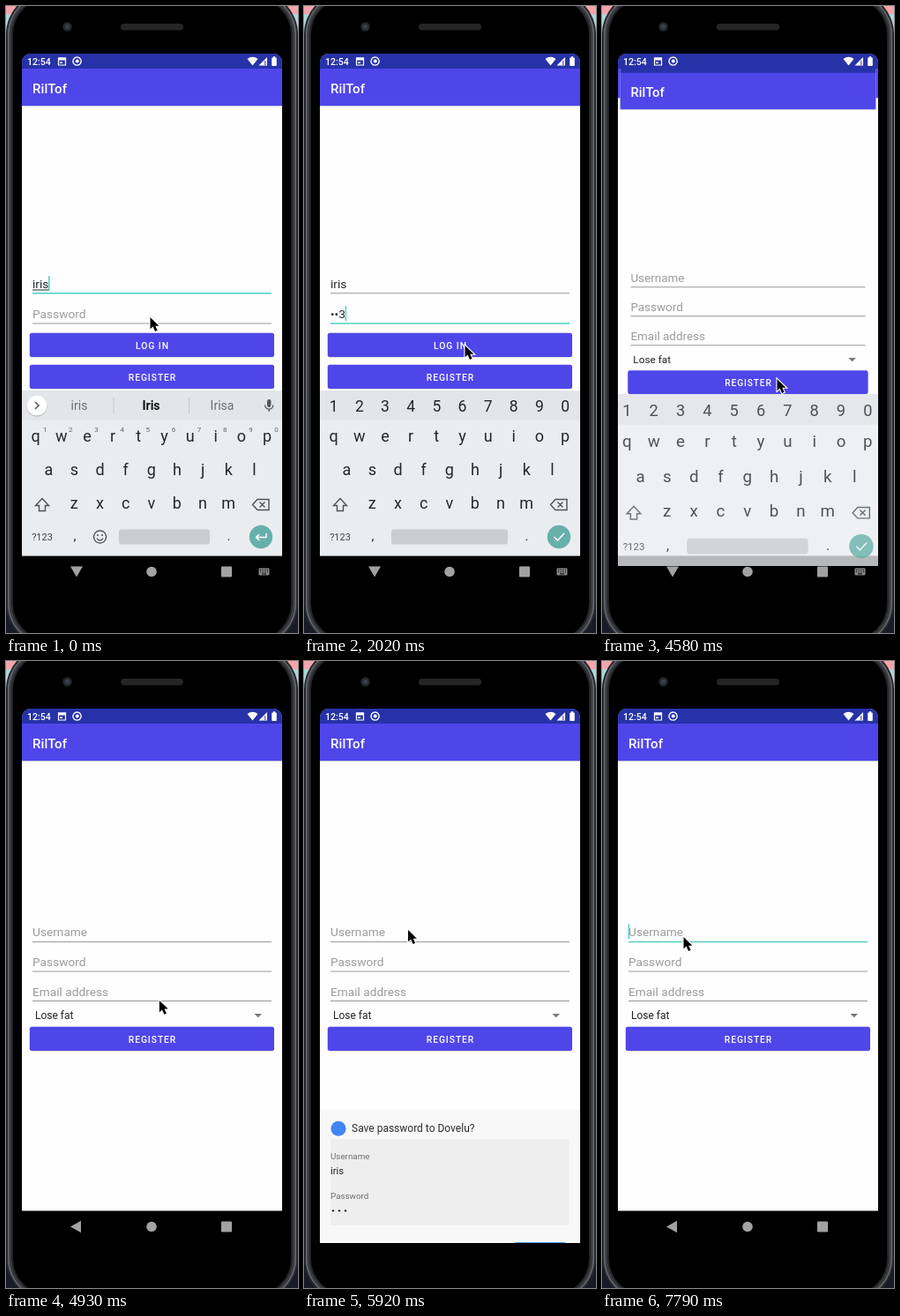
Animation of 331x711 px, one loop 8000 ms. Source, as an HTML page with a canvas:

```html
<!DOCTYPE html>
<html lang="en">
<head>
<meta charset="utf-8">
<title>Login screen demo</title>
<style>
html, body { margin: 0; width: 100%; height: 100%; overflow: hidden; background: #15171c; }
canvas { display: block; width: 331px; height: 711px; }
</style>
</head>
<body>
<canvas id="stage"></canvas>
<script>
const W = 331, H = 711, LOOP = 8000, BOTTOM = 623.6;
const APP = 'RilTof', USER = 'iris', BRAND = 'Dovelu';
const BLUE = '#4f46ea', STATUS = '#2732a8', TEAL = '#4fd0c2', INK = '#23282b', GREY = '#999';
const canvas = document.getElementById('stage');
const c = canvas.getContext('2d');
const dpr = window.devicePixelRatio || 1;
canvas.width = W * dpr;
canvas.height = H * dpr;

// Helpers
const clamp = v => Math.max(0, Math.min(1, v));
const between = (t, a, b) => t >= a && t < b;
const span = (t, a, b) => clamp((t - a) / (b - a));

function rect(x, y, w, h, color, r = 0) {
  c.fillStyle = color;
  c.beginPath();
  c.roundRect(x, y, w, h, r);
  c.fill();
}
function disc(x, y, r, color) {
  c.fillStyle = color;
  c.beginPath();
  c.arc(x, y, r, 0, 7);
  c.fill();
}
function poly(points, color) {
  c.fillStyle = color;
  c.beginPath();
  points.forEach(([x, y]) => c.lineTo(x, y));
  c.closePath();
  c.fill();
}
function stroke(d, color, width = 1.5) {
  c.strokeStyle = color;
  c.lineWidth = width;
  c.stroke(new Path2D(d));
}
function text(s, x, y, size, color, { align = 'left', weight = 400, gap = 0 } = {}) {
  c.font = `${weight} ${size}px Roboto, sans-serif`;
  c.textAlign = align;
  c.letterSpacing = gap + 'px';
  c.fillStyle = color;
  c.fillText(s, x, y);
  return c.measureText(s).width;
}
const centred = (s, x, y, size, color, weight) => text(s, x, y, size, color, { align: 'center', weight });

function zoomed(scale, alpha, draw) {
  c.save();
  c.globalAlpha = alpha;
  c.translate(165.5, 338);
  c.scale(scale, scale);
  c.translate(-165.5, -338);
  draw();
  c.restore();
}

// Widgets
function appPage() {
  rect(18, 54, 295, BOTTOM - 54, '#fefefe');
  rect(18, 54, 295, 18, STATUS);
  rect(18, 71, 295, 42, BLUE);
  rect(18, 113, 295, 1, 'rgba(30,25,110,.25)');
  text(APP, 30, 98.5, 15, '#fff', { weight: 500, gap: .1 });
}
function field(value, hint, base, lineY, focused, cursor) {
  const w = value ? text(value, 30, base, 13.7, INK) : 0;
  if (!value) text(hint, 30, base, 13.7, '#9b9b9b');
  rect(30, lineY - (focused ? .8 : .5), 271, focused ? 1.6 : 1, focused ? TEAL : GREY);
  if (cursor) rect(30 + w - .3, base - 14, 1.5, 17, TEAL);
  return w;
}
function button(label, y, t, press, x) {
  rect(27, y + .6, 277, 27.2, 'rgba(0,0,0,.14)', 3);
  rect(26.8, y - .3, 277.2, 27.3, BLUE, 2.5);
  const dt = t - press + 15;
  if (between(dt, 0, 365)) {
    c.save();
    c.beginPath();
    c.roundRect(27, y, 277, 27, 2.5);
    c.clip();
    disc(x, y + 15, 82 + dt * .8, `rgba(255,255,255,${.11 * (1 - span(dt, 90, 365))})`);
    c.restore();
  }
  text(label, 166, y + 17.5, 10.3, '#fff', { align: 'center', weight: 500, gap: .95 });
}

// Screens
function password(t) {
  if (t < 520) return '';
  if (t < 610) return '1';
  if (t < 780) return '•2';
  return t < 2380 ? '••3' : '•••';
}
function cursorOn(t) {
  const offs = [[1310, 1760], [2380, 2830], [3340, 3780]];
  return !offs.some(([a, b]) => between(t, a, b));
}
function login(t) {
  appPage();
  const onUser = t < 80;
  const w = field(USER, '', 320, 325.8, onUser, onUser);
  if (onUser) rect(30, 321.5, w, 1, INK);
  field(password(t), 'Password', 354, 360, !onUser, !onUser && cursorOn(t));
  button('LOG IN', 371, t, 1670, 182);
  button('REGISTER', 407, t, 3520, 198);
}
function register(t) {
  appPage();
  const focused = between(t, 5380, 5650) || t >= 7690;
  field('', 'Username', 312.3, 318.5, focused, focused);
  field('', 'Password', 346, 352, false);
  field('', 'Email address', 380, 385.5, false);
  text('Lose fat', 33, 406, 12, '#222');
  poly([[281.5, 400], [290, 400], [285.75, 404.3]], '#777');
  button('REGISTER', 415, t, -1e4, 0);
}

function keyboard(t) {
  const words = t < 170;
  rect(18, 436, 295, BOTTOM - 436, '#e9edf0');
  rect(18, 436, 295, 33.5, '#e2e6e9');
  const keyX = i => 33.7 + i * 29.15;
  const row = (keys, first, y, size) =>
    [...keys].forEach((k, i) => centred(k, first + i * 29.15, y, size, INK));

  if (words) {
    disc(35, 454, 11.6, 'rgba(0,0,0,.15)');
    disc(35, 453, 11.3, '#fff');
    stroke('M33 449l4 4-4 4', '#555', 1.5);
    centred(USER, 83, 458, 14, '#667176');
    centred('Iris', 164.5, 458, 14, '#111', 700);
    centred('Irisa', 245, 458, 14, '#667176');
    rect(121.5, 444, 1, 18, '#c3c9cc');
    rect(207, 444, 1, 18, '#c3c9cc');
    rect(296, 446, 4.4, 9, '#50585c', 2.2);
    stroke('M293.6 452.5a4.6 4.6 0 0 0 9.2 0M298.2 457v3', '#50585c', 1.3);
    [...'1234567890'].forEach((n, i) => centred(n, keyX(i) + 10.5, 483, 8, '#5f686c'));
  } else {
    row('1234567890', keyX(0), 459.8, 17.5);
  }
  row('qwertyuiop', keyX(0), 494, 18);
  row('asdfghjkl', 48.3, 532, 18);
  row('zxcvbnm', 77.3, 570, 18);

  stroke('M41 558.5l7.5 8h-4v6h-7v-6h-4z', '#4b5357', 1.4);
  stroke('M285 559.5h13v12h-13l-5.5-6zM287.5 562.5l6 6m0-6l-6 6', '#4b5357', 1.4);
  centred('?123', 41, 606, 11, '#3c4447');
  centred(',', 78, 606, 15, INK);
  centred('.', 252.5, 606, 15, INK);
  const left = words ? 128 : 99;
  rect(left, 593.5, 231 - left, 17, '#c8cdd0', 3);
  disc(289, 602, 13.2, '#67b0aa');
  if (words) {
    stroke('M106.5 595a7 7 0 1 0 .1 0M103 603.5a3.8 3.8 0 0 0 7 0', '#4b5357', 1.3);
    disc(104, 600, 1, '#4b5357');
    disc(109, 600, 1, '#4b5357');
    stroke('M295 598v4.5h-11.5m3.5-3.5l-3.5 3.5 3.5 3.5', '#fff', 1.5);
  } else {
    stroke('M283.5 602l4 4 7.5-8', '#fff', 1.6);
  }
}

function toast(t) {
  const alpha = t < 2980 ? 0 : t < 3500 ? .15 + .1 * span(t, 2980, 3070) : 1 - span(t, 4480, 4560);
  if (!alpha) return;
  c.globalAlpha = alpha;
  rect(109.5, 570, 112, 36.5, 'rgba(0,0,0,.06)', 18);
  rect(110, 569.5, 111, 36, '#f0f0f1', 18);
  centred('Issue with login!', 165.5, 591.3, 10.5, '#222');
  c.globalAlpha = 1;
}

function savePrompt(t) {
  if (!between(t, 5850, 7620)) return;
  const shown = 1 - (1 - span(t, 5850, 6090)) ** 3;
  const hidden = span(t, 7390, 7620) ** 2;
  c.save();
  c.translate(0, 233 * (1 - shown + hidden));
  rect(18, 427.5, 295, BOTTOM - 427.5, '#f8f8f8');
  disc(39, 449, 8.5, '#4285f4');
  text(`Save password to ${BRAND}?`, 54, 453, 12, '#2b2b2b');
  rect(30, 461, 270.5, 97.5, '#eee');
  text('Username', 30, 483.5, 9.8, '#6d6d6d');
  text(USER, 30, 501, 11.3, '#222');
  text('Password', 30, 529, 9.8, '#6d6d6d');
  [33, 40, 47].forEach(x => disc(x, 542, 1.2, '#222'));
  text('No thanks', 177, 595.5, 10.8, '#2379dc');
  rect(237.5, 578, 60.5, 27, '#207de3', 3);
  centred('Save', 267.7, 595.5, 10.8, '#fff', 500);
  c.restore();
}

// Device
function body() {
  const back = c.createLinearGradient(0, 0, 0, H);
  back.addColorStop(0, '#f4a4ac');
  back.addColorStop(.012, '#f4a4ac');
  back.addColorStop(.014, '#a8d8dc');
  back.addColorStop(.05, '#c9d3d8');
  back.addColorStop(.1, '#33363c');
  back.addColorStop(1, '#181a28');
  c.fillStyle = back;
  c.fillRect(0, 0, W, H);
  // Metal rim as nested rounded layers: inset and colour
  [[0, '#26282b'], [2, '#66696d'], [3.5, '#3a3c40'], [6, '#222427'], [8, '#000']].forEach(([inset, color]) =>
    rect(inset, inset - 16, W - 2 * inset, 742 - 2 * inset, color, 48 - inset));
  disc(69.5, 23.5, 5.2, '#24272c');
  disc(69.5, 23.5, 2.8, '#3a404a');
  rect(130, 20, 71, 7.5, '#252526', 3.5);
}

function statusIcons() {
  text('12:54', 24, 66.8, 10.6, '#fff', { weight: 500 });
  stroke('M59.5 59h8v8h-8z', '#fff', 1.2);
  rect(59, 58.5, 9, 3, '#fff');
  rect(61, 63.5, 3, 1.5, '#fff');
  stroke('M80.5 58a4.6 4.6 0 1 0 .1 0', '#fff', 1.3);
  disc(80.7, 62.4, 2, '#fff');
  c.fillStyle = '#fff';
  c.fill(new Path2D('M273.5 60q6-4.5 12 0l-6 7.5z'));
  poly([[296, 58], [296, 67.5], [286.5, 67.5]], '#fff');
  rect(293.3, 62, 1, 5, STATUS);
  rect(301.2, 58.5, 5.6, 9.5, '#fff', 1);
  rect(302.8, 57.2, 2.4, 2, '#fff');
}

function navIcons(typing) {
  const color = '#a2a2a2';
  poly(typing ? [[73, 635.5], [87, 635.5], [80, 647.5]] : [[85, 634.8], [85, 648.2], [73, 641.5]], color);
  disc(165, 641.5, 5.8, color);
  rect(244, 635.5, 12, 12, color, 1);
  if (!typing) return;
  rect(286.5, 637.5, 12, 8, '#888', 1);
  for (let i = 0; i < 8; i++) rect(288 + (i % 4) * 2.6, 639 + (i >> 2) * 2.2, 1.2, 1.1, '#000');
  rect(290, 643.4, 5, 1, '#000');
}

// Each entry: time, x, y of the pointer tip
const PATH = [
  [0, 163.5, 353], [1060, 163.5, 353], [1310, 182.5, 385], [2420, 182.5, 385], [2830, 198.5, 423],
  [4760, 198.5, 423], [5200, 135, 325], [5290, 118, 305], [7430, 118, 305], [7700, 92.5, 313], [LOOP, 92.5, 313]
];
function pointer(t) {
  const i = PATH.findIndex(([end]) => end > t);
  const [t0, x0, y0] = PATH[i - 1], [t1, x1, y1] = PATH[i];
  const k = span(t, t0, t1);
  c.save();
  c.translate(x0 + (x1 - x0) * k, y0 + (y1 - y0) * k);
  c.scale(.92, .92);
  const arrow = 'M0 0v14.5l3.4-3 2.6 5.8 2.8-1.2-2.6-5.6h4.6z';
  stroke(arrow, '#fff', 2.4);
  c.fillStyle = '#000';
  c.fill(new Path2D(arrow));
  c.restore();
}

function screen(t) {
  const p = span(t, 4460, 4830);
  if (p < 1) {
    const grow = 1 + .123 * p;
    zoomed(grow, 1, () => login(t));
    rect(18, BOTTOM, 295, 37, '#000');
    if (p) zoomed(1 - .128 * (1 - p) ** 5, Math.min(1, p * 8), () => register(t));
    zoomed(grow, Math.max(0, 1 - p ** 1.35), () => keyboard(t));
    toast(t);
  } else {
    register(t);
    savePrompt(t);
  }
  rect(18, 54, 295, 17, STATUS);
}

function draw(t) {
  c.setTransform(dpr, 0, 0, dpr, 0, 0);
  body();
  c.save();
  c.beginPath();
  c.roundRect(18, 54, 295, 606, [10, 10, 0, 0]);
  c.clip();
  screen(t);
  c.restore();
  statusIcons();
  const sliding = between(t, 5850, 6085) || between(t, 7395, 7620);
  if (!sliding) navIcons(t < 4850);
  pointer(t);
}

function tick() {
  draw(performance.now() % LOOP);
  requestAnimationFrame(tick);
}
tick();
</script>
</body>
</html>
```
